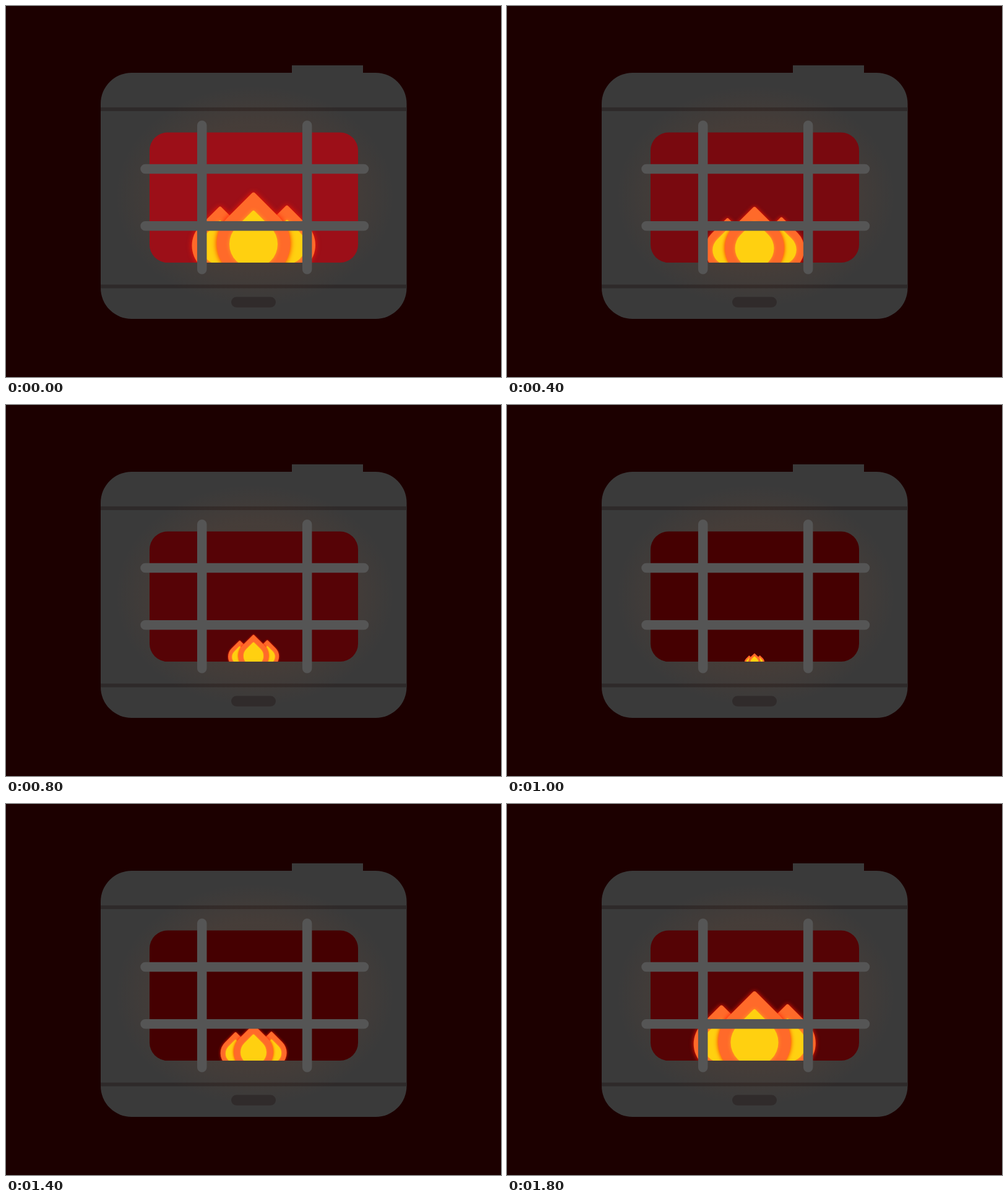
An HTML page for the animation above (2000 ms loop, 800 px wide and 600 px high).

```html
<!DOCTYPE html>
<html lang="en">
<head>
<meta charset="utf-8">
<title>Stove</title>
<style>
  html, body { margin: 0; height: 100%; overflow: hidden; background: #1c0000; }
  svg { display: block; width: 800px; height: 600px; }
  .outer { fill: #ff6a2a; filter: drop-shadow(0 0 4px #ff1800); }
  .inner { fill: #ffd010; filter: drop-shadow(0 0 3px #ffa81c); }
</style>
</head>
<body>
<svg viewBox="0 0 800 600">
  <defs>
    <radialGradient id="heat">
      <stop offset=".65" stop-color="#ff6a20" stop-opacity=".06"/>
      <stop offset="1" stop-color="#ff6a20" stop-opacity="0"/>
    </radialGradient>
    <clipPath id="pane"><rect x="232" y="204.5" width="337" height="210.5" rx="29"/></clipPath>
  </defs>
  <g fill="#3a3a3a">
    <rect x="462" y="96" width="115" height="20"/>
    <rect x="153" y="108" width="494.5" height="398" rx="50"/>
  </g>
  <path d="M153 167H647.5M153 453.5H647.5" stroke="#2e2a2a" stroke-width="6"/>
  <ellipse cx="402" cy="308" rx="226" ry="180" fill="url(#heat)"/>
  <rect x="364" y="470.5" width="72" height="17" rx="8.5" fill="#302b2b"/>
  <g clip-path="url(#pane)">
    <rect id="window" x="232" y="204" width="337" height="212"/>
    <g id="fire"></g>
  </g>
  <path d="M225 263.5H578.5M225 355.8H578.5M316.7 193V426M486.7 193V426"
        stroke="#555" stroke-width="15.5" stroke-linecap="round"/>
</svg>
<script>
  const LOOP = 2000, STEP = 200, BASE = 420.7;
  const pane = document.getElementById('window');
  const fire = document.getElementById('fire');

  // A circle with a right-angled, slightly softened tip on top.
  function drop(kind, x, y, r) {
    const a = r * Math.SQRT1_2, soft = r * 0.05, tip = y - r * Math.SQRT2;
    return `<path class="${kind}" d="M${x - soft} ${tip + soft}Q${x} ${tip} ${x + soft} ${tip + soft}` +
      `L${x + a} ${y - a}A${r} ${r} 0 1 1 ${x - a} ${y - a}Z"/>`;
  }
  const flame = (x, y, r, core) => drop('outer', x, y, r) + drop('inner', x, y + 1, core);
  fire.innerHTML = flame(346, 387.5, 45.5, 30) + flame(454, 386.5, 46, 30) + flame(400, 384, 59.3, 39);

  const mix = (a, b, k) => a.map((v, i) => Math.round(v + (b[i] - v) * k));

  function flameScale(t) {
    if (t <= 1000) return 1 - 0.84 * (t / 1000) ** 1.6;
    const x = Math.min(1, (t - 1000) / 860);
    return 0.16 + 0.84 * x * x * (3 - 2 * x);
  }

  function heat(t) {
    if (t <= 1000) return 1 - t / 1000;
    return 0.18 * (Math.max(0, t - 1400) / 400) ** 2;
  }

  function draw(now) {
    const t = Math.floor(now % LOOP / STEP) * STEP;
    const s = flameScale(t);
    fire.setAttribute('transform', `translate(400 ${BASE}) scale(${s}) translate(-400 ${-BASE})`);
    pane.setAttribute('fill', `rgb(${mix([69, 0, 1], [156, 15, 24], heat(t))})`);
    requestAnimationFrame(() => draw(performance.now()));
  }
  draw(0);
</script>
</body>
</html>
```
